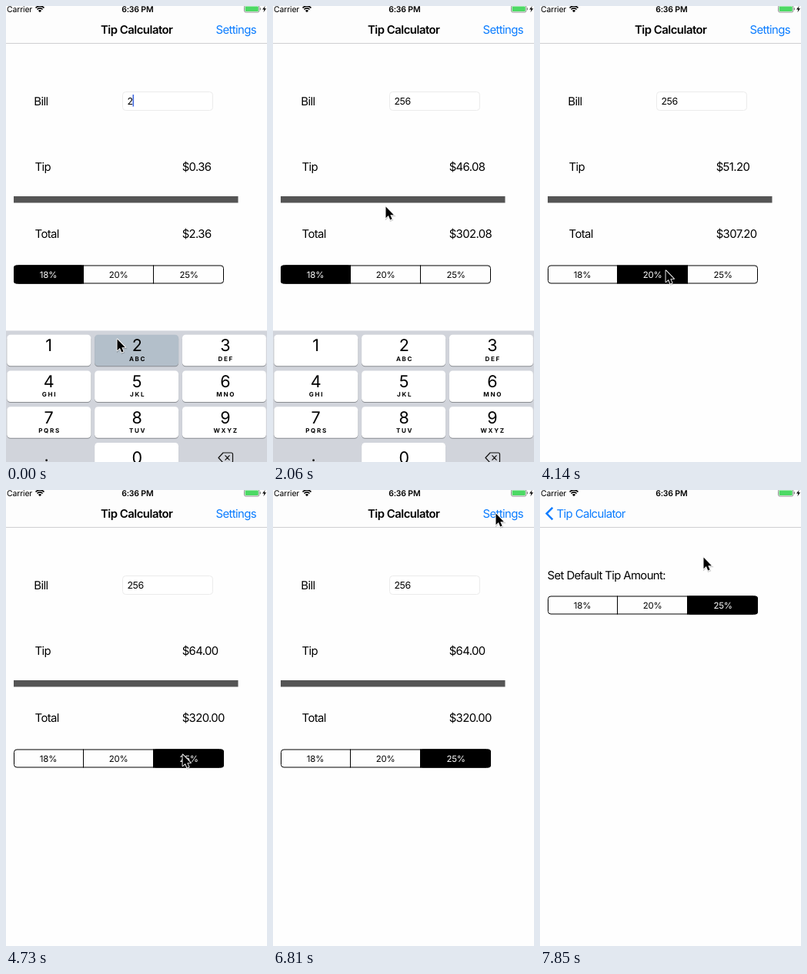
Animation of 339 by 592 pixels, one loop 8 s. Source, as an HTML page:

```html
<!DOCTYPE html>
<html lang="en">
<head>
<meta charset="utf-8">
<title>Tip Calculator</title>
<style>
  html, body { margin: 0; width: 100%; height: 100%; overflow: hidden; background: #fefefe; }
  svg { display: block; width: 100%; height: 100%; }
  text { font-family: Inter, Roboto, sans-serif; text-rendering: geometricPrecision; white-space: pre; }
  .body { font-size: 14.9px; letter-spacing: -.62px; }
  .title { font-size: 14.9px; letter-spacing: -.5px; font-weight: 600; }
  .field { font-size: 12.4px; letter-spacing: -.4px; }
  .segment { font-size: 11.4px; letter-spacing: -.2px; }
  .status { font-size: 10.5px; letter-spacing: -.18px; }
  .digit { font-size: 21.5px; }
  .letters { font-size: 8px; font-weight: 700; letter-spacing: 1.7px; }
  .mid { text-anchor: middle; }
</style>
</head>
<body>
<svg id="stage" viewBox="0 0 339 592" preserveAspectRatio="none"></svg>
<script>
const LOOP = 8000, TICK = 148, LAST_TICK = 53;
const WIDTH = 339, BLUE = '#0a7cff';
const RATES = [18, 20, 25];
const LETTERS = ['', 'ABC', 'DEF', 'GHI', 'JKL', 'MNO', 'PQRS', 'TUV', 'WXYZ'];

// Pointer path: tick, x, y
const POINTER = [
  [0, 144, 432], [2, 146, 440], [4, 160, 488], [6, 163, 489], [8, 255, 489],
  [10, 278, 490], [12, 276, 484], [14, 146, 260], [17, 146, 260], [20, 138, 325],
  [22, 135, 343], [27, 136, 343], [28, 163, 343], [31, 228, 343], [34, 232, 343],
  [35, 200, 346], [37, 55, 355], [38, 53, 354], [41, 259, 45], [46, 289, 30],
  [51, 289, 30], [53, 212, 87]
];

const clamp = v => Math.max(0, Math.min(1, v));
const mix = (a, b, p) => a + (b - a) * p;
const easeOut = u => 1 - (1 - clamp(u)) ** 3;

// Value of the latest [tick, value] entry that has begun
const latest = (entries, tick) => entries.filter(e => e[0] <= tick).pop()[1];

const text = (x, y, cls, str, fill = '#000', opacity = 1) =>
  `<text x="${x}" y="${y}" class="${cls}" fill="${fill}" opacity="${opacity}">${str}</text>`;
const rect = (x, y, w, h, fill, extra = '') =>
  `<rect x="${x}" y="${y}" width="${w}" height="${h}" fill="${fill}" ${extra}/>`;
const group = (x, y, content, opacity = 1) =>
  `<g transform="translate(${x} ${y})" opacity="${opacity}">${content}</g>`;

function pointerAt(tick) {
  const i = POINTER.findIndex(k => k[0] >= tick);
  const [t1, x1, y1] = POINTER[i];
  const [t0, x0, y0] = POINTER[Math.max(0, i - 1)];
  const p = t1 > t0 ? (tick - t0) / (t1 - t0) : 1;
  return [Math.round(mix(x0, x1, p)), Math.round(mix(y0, y1, p))];
}

function statusBar() {
  const arc = r => `<path d="M${44 - r * .72} ${8 - r * .72}A${r} ${r} 0 0 1 ${44 + r * .72} ${8 - r * .72}" fill="none" stroke="#000" stroke-width="1.7"/>`;
  return text(1, 8.2, 'status', 'Carrier') +
    arc(7.6) + arc(4.9) + '<path d="M44 8.3L41.9 6A3 3 0 0 1 46.1 6Z"/>' +
    text(170.8, 8.2, 'status mid', '6:36 PM').replace('<text', '<text font-weight="600"') +
    rect(309.5, -.6, 19.4, 8.7, 'none', 'rx="2" stroke="#777" stroke-width=".8"') +
    rect(310.6, .6, 17.2, 6.3, '#4cd964', 'rx="1"') +
    rect(329.8, 2.3, 1.1, 3, '#777', 'rx=".5"') +
    '<path d="M336.6 0L333 4.6H335.4L334.4 8.2L338 3.3H335.6Z"/>';
}

function segments(y, selected) {
  const edges = [10, 100.5, 191.5, 283];
  let out = '';
  RATES.forEach((rate, i) => {
    const on = i === selected;
    const x = edges[i], w = edges[i + 1] - x;
    if (on) out += rect(x, y, w, 24, '#000', i === 1 ? '' : 'rx="3.5"') +
      (i === 0 ? rect(x + 6, y, w - 6, 24, '#000') : i === 2 ? rect(x, y, w - 6, 24, '#000') : '');
    out += text([55, 146.2, 237.6][i], y + 16, 'segment mid', rate + '%', on ? '#fff' : '#000');
  });
  return out + rect(10.5, y + .5, 272, 23, 'none', 'rx="3.5" stroke="#000"') +
    `<path d="M100.5 ${y}v24M191.5 ${y}v24" stroke="#000"/>`;
}

function calculator(bill, selected, caret) {
  const tip = bill * RATES[selected] / 100;
  const money = v => '$' + v.toFixed(2);
  return rect(0, 49, WIDTH, 543, '#fefefe') +
    text(36.3, 129.2, 'body', 'Bill') +
    rect(151.5, 111.5, 117, 24, '#fff', 'rx="4" stroke="#ebebeb"') +
    text(157.4, 127.6, 'field', bill) +
    (caret ? rect(157.2 + 7.3 * String(bill).length, 115, 1.6, 15.5, '#4169e0') : '') +
    text(37.6, 213.6, 'body', 'Tip') + text(228.7, 213.6, 'body', money(tip)) +
    rect(10, 247, 291.5, 8.5, '#555') +
    text(37.6, 301.4, 'body', 'Total') + text(228.7, 301.4, 'body', money(bill + tip)) +
    segments(336.5, selected);
}

function settings() {
  return rect(0, 49, WIDTH, 543, '#fefefe') +
    text(9.6, 116, 'body', 'Set Default Tip Amount:') + segments(137.5, 2);
}

function keyboard(pressed) {
  const key = (col, y, fill) => {
    const x = 1.3 + 113.8 * col;
    return rect(x, y + 1, 109, 40.5, '#898c91', 'rx="4.5"') + rect(x, y, 109, 40.5, fill, 'rx="4.5"');
  };
  const centre = col => 55.6 + 114.6 * col;
  let out = rect(0, 421.5, WIDTH, 190, '#d1d4db');
  LETTERS.forEach((letters, i) => {
    const col = i % 3, y = 426.8 + 46.7 * Math.floor(i / 3);
    out += key(col, y, i + 1 === pressed ? '#b3bfca' : '#fff') +
      text(centre(col), y + 21.6, 'digit mid', i + 1) +
      text(centre(col) + .9, y + 33.8, 'letters mid', letters);
  });
  return out + key(1, 566.9, '#fff') + text(centre(1), 594.3, 'digit mid', 0) +
    text(52.6, 590.5, 'digit mid', '.') +
    '<path d="M276 586.5L282 580H292.5Q294.5 580 294.5 582V591Q294.5 593 292.5 593H282ZM284.5 583.3l6 6.4m0-6.4l-6 6.4" fill="none" stroke="#111" stroke-width="1.2" stroke-linejoin="round"/>';
}

function navBar(push, settingsOpacity) {
  const x = mix(123, 21.6, push);
  return rect(0, 0, WIDTH, 48.5, '#fdfdfd') + rect(0, 48, WIDTH, 1, '#cfcfd1') + statusBar() +
    text(x, 36, 'title', 'Tip Calculator', '#000', clamp(1 - push * 1.4)) +
    text(x, 36, 'body', 'Tip Calculator', BLUE, push) +
    `<path d="M16.3 22.8L8.6 30.6L16.3 38.4" fill="none" stroke="${BLUE}" stroke-width="2.5" opacity="${push}"/>` +
    text(272.6, 36, 'body', 'Settings', BLUE, settingsOpacity);
}

function pointer(tick) {
  const arrow = 'M.5 .5V15.2L3.9 12.1L6.2 17.6L8.6 16.6L6.3 11.2H10.9Z';
  return group(...pointerAt(tick),
    `<path d="${arrow}" transform="translate(.4 1)" stroke="#000" stroke-width="2" opacity=".18"/>` +
    `<path d="${arrow}" stroke="#fff" stroke-width="1.8" paint-order="stroke" stroke-linejoin="round"/>`);
}

function scene(tick) {
  const bill = latest([[0, 2], [5, 25], [11, 256]], tick);
  const selected = latest([[0, 0], [23, 1], [31, 2]], tick);
  const pressed = latest([[0, 2], [1, 0], [4, 5], [6, 0], [10, 6], [12, 0]], tick);
  const keyboardDrop = latest([[0, 0], [15, 95], [16, 180]], tick);
  const push = tick >= LAST_TICK ? 1 : easeOut((tick - 49) / 3.5);
  const settingsOpacity = tick < 49 ? 1 : .3 * (1 - push);

  let out = group(-.3 * WIDTH * push, 0, calculator(bill, selected, tick < 13));
  if (keyboardDrop < 180) out += group(0, keyboardDrop, keyboard(pressed));
  if (push > 0) out += rect(0, 49, WIDTH, 543, '#000', `opacity="${.1 * push}"`) +
    group(WIDTH * (1 - push), 0, settings());
  return out + navBar(push, settingsOpacity) + pointer(tick);
}

const stage = document.getElementById('stage');
let shown = -1;
function render(now) {
  const tick = Math.min(LAST_TICK, Math.floor((now % LOOP + 12) / TICK));
  if (tick !== shown) stage.innerHTML = scene(shown = tick);
  requestAnimationFrame(() => render(performance.now() - start));
}
const start = performance.now();
render(0);
</script>
</body>
</html>
```
